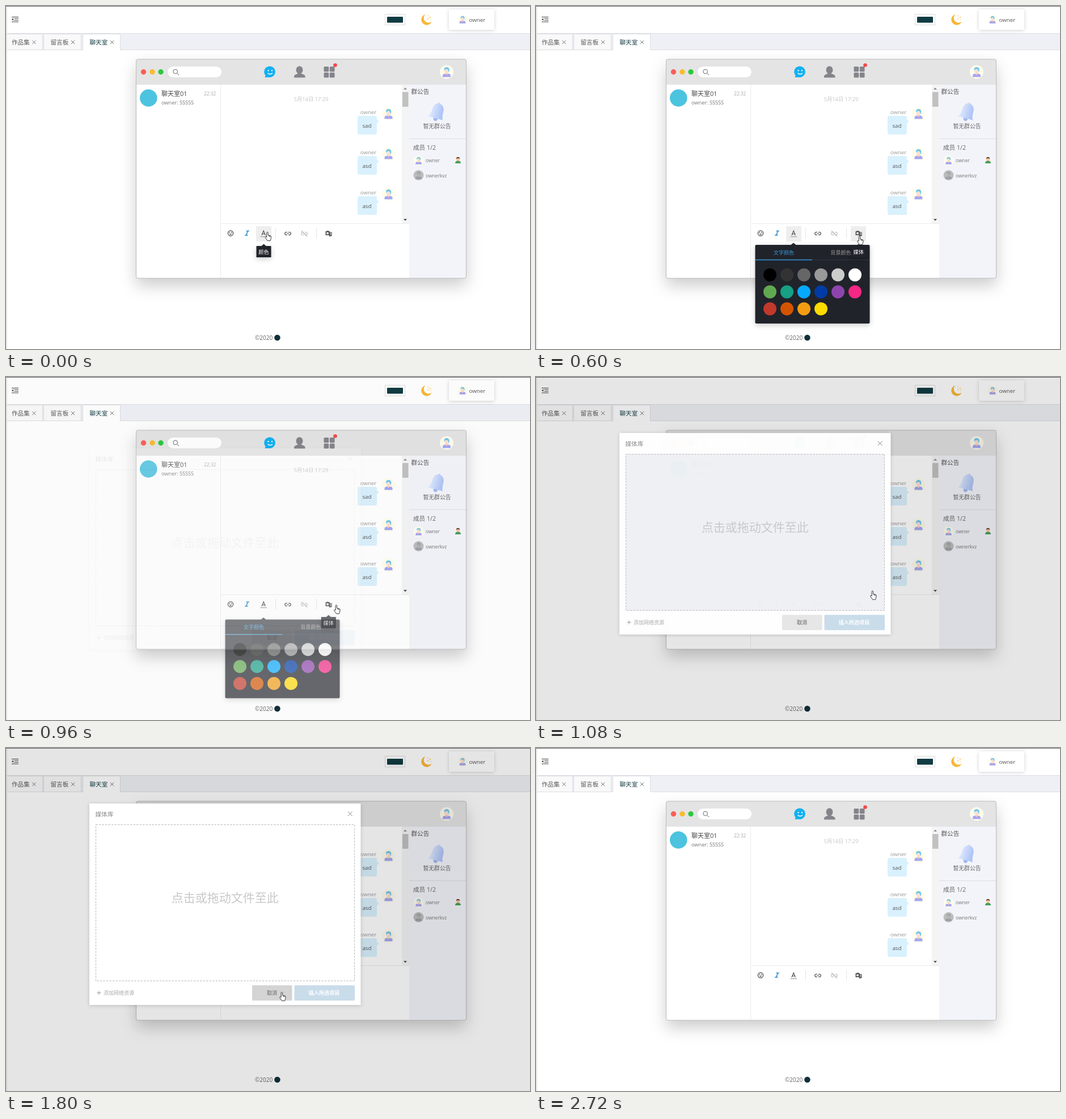
An HTML page for the animation above (2960 ms loop, 924 by 606 pixels).

```html
<!DOCTYPE html>
<html lang="zh-CN">
<head>
<meta charset="utf-8">
<title>聊天室</title>
<style>
html, body { margin: 0; height: 100%; overflow: hidden; background: #fff; }
svg { display: block; width: 100vw; height: 100vh; }
text { font-family: "Open Sans", "Noto Sans CJK SC", "Noto Sans CJK", sans-serif; white-space: pre; }
.mid { text-anchor: middle; }
.card { filter: drop-shadow(0 1px 3px rgba(0,0,0,.18)); }
.win { filter: drop-shadow(0 13px 14px rgba(0,0,0,.2)); }
.pop { filter: drop-shadow(0 3px 5px rgba(0,0,0,.2)); }
.line { fill: none; stroke: #444; stroke-width: 1.2; }
</style>
</head>
<body>
<svg viewBox="0 0 924 606">
  <defs>
    <linearGradient id="edge"><stop stop-color="#d8d8d8"/><stop offset="1" stop-color="#fff" stop-opacity="0"/></linearGradient>
    <linearGradient id="bell"><stop stop-color="#e3edfd"/><stop offset="1" stop-color="#a5bdf6"/></linearGradient>
    <g id="person">
      <path d="M-7 9V6.500Q-7 3.500-3 3H3Q7 3.500 7 6.500V9Z" fill="#a3a6f5"/>
      <path d="M-1.800 0H1.800V4L0 5.500-1.800 4Z" fill="#f7cdb8"/>
      <ellipse cy="-2.300" rx="3.700" ry="4.300" fill="#fde0d0"/>
      <path d="M-4.200-2.500Q-5.500-8.500 0-8.500 6-8.500 4.500-1L3.500 1Q3.500-4 .5-5.200-2.500-5.500-4.200-2.500Z" fill="#6cc6f0"/>
    </g>
    <g id="face"><circle r="12" fill="#fffcec"/><use href="#person"/></g>
    <path id="x" d="M-3.200-3.200 3.200 3.200M3.200-3.200-3.200 3.200" fill="none"/>
  </defs>

  <!-- page header and tabs -->
  <rect y="48.500" width="924" height="29.500" fill="#eff0f5"/>
  <path d="M0 48.500H924M0 77.500H924" stroke="#dcdee4"/>
  <g stroke="#dcdde2">
    <path d="M-1 49.500H64.500V77.500H-1ZM66.500 49.500H132.500V77.500H66.500Z" fill="#f9f9fa"/>
    <path d="M135.500 78V49.500H201.500V78" fill="#fff"/>
  </g>
  <g font-size="10.6" fill="#595959">
    <text x="10" y="67.800">作品集</text><text x="78.500" y="67.800">留言板</text>
    <text x="147.500" y="67.800" fill="#123c42" font-weight="500">聊天室</text>
  </g>
  <g stroke="#777"><use href="#x" x="49.500" y="64"/><use href="#x" x="118" y="64"/><use href="#x" x="187" y="64"/></g>
  <path d="M10 19.500H22M14.500 22.300H22M14.500 25.200H22M10 28H22" stroke="#444" stroke-width="1.100"/>
  <path d="M13 21.500V26L10 23.800Z" fill="#444"/>
  <rect x="668.500" y="14.500" width="35" height="19" fill="#fff" stroke="#ddd"/>
  <rect x="672" y="19" width="28" height="10.500" rx="1" fill="#113b42"/>
  <path d="M739.500 15A9.400 9.400 0 1 0 750.500 27.500 8 8 0 0 1 739.500 15Z" fill="#f8b735"/>
  <g fill="#fad784"><circle cx="744" cy="17.500" r="1"/><circle cx="748" cy="20" r="1.300"/><circle cx="744" cy="22.500" r="1.200"/><circle cx="749" cy="24" r=".8"/></g>
  <rect class="card" x="781" y="6" width="80" height="36" rx="2" fill="#fff"/>
  <use href="#face" transform="translate(805 24) scale(.75)"/>
  <text x="816.500" y="28" font-size="9.800" fill="#555">owner</text>
  <rect width="4" height="606" fill="url(#edge)"/>
  <path d="M0 .5H924" stroke="#666"/>

  <!-- chat window -->
  <rect class="win" x="229.500" y="94" width="582" height="387" rx="3" fill="#fff"/>
  <path d="M229.500 139V97Q229.500 94 232.500 94H808.500Q811.500 94 811.500 97V139Z" fill="#e4e4e4"/>
  <path d="M711 139H811.500V481H711Z" fill="#f3f4f9"/>
  <path d="M711 234.500H811" stroke="#dcdee4"/>
  <path d="M378.500 139V481M379 384.500H711" stroke="#ebebeb"/>
  <rect x="229.500" y="94" width="582" height="387" rx="3" fill="none" stroke="#bcbcbc"/>
  <circle cx="242.500" cy="116.500" r="4.700" fill="#fb5e57"/>
  <circle cx="258" cy="116.500" r="4.700" fill="#f8bc2f"/>
  <circle cx="273" cy="116.500" r="4.700" fill="#2bc840"/>
  <rect x="285" y="107" width="95" height="19" rx="9.500" fill="#fff"/>
  <path d="M301.800 119 305 122M302.500 115.800A3.800 3.800 0 1 1 294.900 115.800 3.800 3.800 0 1 1 302.500 115.800" fill="none" stroke="#666"/>
  <path d="M456 125.500Q458 124.500 457.500 122.500A9.800 9.800 0 1 1 463 125.800Q459 126.500 456 125.500Z" fill="#12b1f2"/>
  <circle cx="462.500" cy="114" r="1.200" fill="#fff"/><circle cx="469" cy="114" r="1.200" fill="#fff"/>
  <path d="M461.500 118.500Q465.700 122.500 470 118.500" fill="none" stroke="#fff" stroke-width="1.300"/>
  <g fill="#84848b">
    <ellipse cx="517.500" cy="113" rx="6" ry="6.800"/>
    <path d="M508 126.500V124Q508 121.500 514.500 119.500V117H520.500V119.500Q527.500 121.500 527.500 124V126.500Z"/>
    <rect x="560.500" y="107" width="8.700" height="9" rx="1.500"/><rect x="570.800" y="107" width="8.700" height="9" rx="1.500"/>
    <rect x="560.500" y="117.500" width="8.700" height="9" rx="1.500"/><rect x="570.800" y="117.500" width="8.700" height="9" rx="1.500"/>
  </g>
  <circle cx="580.500" cy="104.500" r="3.300" fill="#f5484a"/>
  <use href="#face" x="777" y="116.500"/>

  <circle cx="251.300" cy="162.500" r="15.300" fill="#4cc3df"/>
  <text x="274" y="159" font-size="11" fill="#444">聊天室01</text>
  <text x="274" y="174" font-size="9.200" fill="#777">owner: SSSSS</text>
  <text x="349" y="158" font-size="8.400" fill="#aaa">22:32</text>
  <text class="mid" x="538" y="167.500" font-size="9.300" fill="#c4c4c4">5月14日 17:29</text>
  <g id="messages"></g>
  <path d="M698 139H711V384H698Z" fill="#f4f4f4"/>
  <path d="M699 152H709.500V178H699Z" fill="#c1c1c1"/>
  <path d="M701 147.500H707L704 144.300Z" fill="#888"/><path d="M701 376.300H707L704 379.500Z" fill="#444"/>

  <text x="714.500" y="154.800" font-size="10.600" fill="#555">群公告</text>
  <g transform="translate(760 186) rotate(15)">
    <circle cx="1" cy="13.500" r="3.800" fill="#9fb8f3"/>
    <path d="M-14 12.500Q-9 9-9-2-9-12-1-14.500 0-17.500 2-14.500 11-12 11-2 11 9 14 12.500Z" fill="url(#bell)"/>
  </g>
  <text class="mid" x="760" y="216" font-size="9.800" fill="#666">暂无群公告</text>
  <text x="718" y="254" font-size="10.600" fill="#666">成员 1/2</text>
  <use href="#face" transform="translate(727.500 273) scale(.75)"/>
  <text x="740" y="276.300" font-size="8.500" fill="#777">owner</text>
  <circle cx="727.500" cy="299" r="9" fill="#bcbcbc"/>
  <g opacity=".5" style="filter:grayscale(.6) brightness(.75)"><use href="#person" transform="translate(727.500 299) scale(.75)"/></g>
  <text x="740" y="302.500" font-size="8.400" fill="#777">ownerkvz</text>
  <path d="M792 278Q792 274 795.500 273.500H798.500Q802 274 802 278Z" fill="#3fa65a"/>
  <circle cx="797" cy="270.500" r="3.100" fill="#f6c69b"/><path d="M793.700 270Q794 266.800 797 266.800T800.300 270Q797 268 793.700 270Z" fill="#6b4030"/>
  <path d="M796.200 273.500H797.800L797 277Z" fill="#e44"/>

  <!-- editor toolbar -->
  <rect id="hoverA" x="441" y="389" width="27" height="27" fill="#eee"/>
  <rect id="hoverMedia" x="555" y="389" width="27" height="27" fill="#eee"/>
  <path d="M475.500 392V411M547.500 392V411" stroke="#e4e4e4"/>
  <circle class="line" cx="396" cy="401.500" r="4.600"/>
  <path d="M393.600 402.500Q396 406 398.400 402.500Z" fill="#444"/><circle cx="394.200" cy="400" r=".8"/><circle cx="397.800" cy="400" r=".8"/>
  <path d="M423.500 397.500H429M421 405H426.500M426.300 397.500 423.700 405" stroke="#2f8fd0" stroke-width="1.600"/>
  <path class="line" d="M451 405 454.200 397.200 457.400 405M452.200 402.600H456.200" style="stroke:#555"/>
  <path d="M448.500 407.500H460" stroke="#aaa" stroke-width="1.500"/>
  <g id="link"><path class="line" d="M496 399.500H494.300A2.400 2.400 0 0 0 494.300 404.500H496M498 399.500H499.700A2.400 2.400 0 0 1 499.700 404.500H498M494.700 402H499.300"/></g>
  <g opacity=".35"><use href="#link" x="29"/><path class="line" d="M521 397 531 407"/></g>
  <path d="M563.500 398H565L566 397H568.500L569.500 398H571V405H563.500Z" fill="#555"/><circle cx="567" cy="401.500" r="1.900" fill="#fff"/>
  <path class="line" d="M571.800 406V400H574V405.500" style="stroke:#555"/><circle cx="571" cy="406" r="1.300" fill="#555"/><circle cx="573.300" cy="405.500" r="1.200" fill="#555"/>

  <text x="439" y="590" font-size="10" fill="#666">©2020</text>
  <circle cx="478.400" cy="586" r="5.300" fill="#12303a"/>

  <!-- colour picker -->
  <g id="picker">
    <path class="pop" d="M388.500 422H449.500L454 418.500 458.500 422H586.500Q588.500 422 588.500 424V559Q588.500 561 586.500 561H388.500Q386.500 561 386.500 559V424Q386.500 422 388.500 422Z" fill="#20232a"/>
    <path d="M387 448.500H588" stroke="#343840"/><path d="M387 448.500H487" stroke="#3498db" stroke-width="1.300"/>
    <text class="mid" x="437" y="438.500" font-size="9.100" fill="#3498db">文字颜色</text>
    <text class="mid" x="537.500" y="438.500" font-size="9.100" fill="#999">背景颜色</text>
    <g id="swatches"></g>
  </g>
  <g id="tipColor"></g>
  <g id="tipMedia"></g>

  <!-- media dialog -->
  <rect id="mask" width="924" height="606"/>
  <g id="dialog">
    <rect class="card" x="147" y="98" width="478.500" height="356" fill="#fff"/>
    <text x="157.500" y="120.800" font-size="10.600" fill="#888">媒体库</text>
    <use href="#x" transform="translate(606.700 116.300) scale(1.200)" stroke="#aaa" stroke-width=".9"/>
    <rect id="drop" x="158.500" y="135.500" width="456" height="276" stroke="#b8b8b8" stroke-dasharray="3.500 2"/>
    <text class="mid" x="386.300" y="271.800" font-size="21" fill="#c8c8c8">点击或拖动文件至此</text>
    <path d="M160.500 432.500H167.500M164 429V436" stroke="#999"/>
    <text x="172" y="436.300" font-size="9" fill="#aaa">添加网络资源</text>
    <rect id="cancel" x="434" y="419.300" width="70.500" height="27" rx="1.500"/>
    <text class="mid" x="469" y="436.300" font-size="9.100" font-weight="700" fill="#888">取消</text>
    <rect x="508.500" y="419.300" width="106.500" height="27" rx="1.500" fill="#c9dcea"/>
    <text class="mid" x="561" y="436.300" font-size="9.100" font-weight="700" fill="#fff">插入所选项目</text>
  </g>

  <path id="hand" d="M3.200 9.500V1.600a1.200 1.200 0 0 1 2.400 0V6l4.200.9q1.400.4 1.300 1.800l-.6 4-1 3H4.600L1 10.600q-.9-1.200.1-1.800t2.100.7zM7.300 6.500V8.500M9 7V9" fill="#fff" stroke="#222" stroke-width=".9"/>
</svg>
<script>
const $ = id => document.getElementById(id);
const LOOP = 2960, STEP = 40;

$("messages").innerHTML = ["sad", "asd", "asd"].map((word, i) => `
  <g transform="translate(0 ${i * 71})">
    <text class="mid" x="639" y="190.500" font-size="9.700" fill="#999">owner</text>
    <rect x="620" y="194" width="34" height="33" rx="3" fill="#d9f1fd"/>
    <path d="M653 200 658 203.500 653 208Z" fill="#d9f1fd"/>
    <text class="mid" x="636.500" y="215" font-size="9.800" fill="#555">${word}</text>
    <use href="#face" x="674.500" y="190.500"/>
  </g>`).join("");

const colors = ("000 333 666 999 ccc fff 61a951 16a085 07a9fe 003ba5 8e44ad f32784 " +
  "c0392b d35400 f39c12 fdda00").split(" ");
$("swatches").innerHTML = colors.map((c, i) =>
  `<circle cx="${412.5 + i % 6 * 30}" cy="${475 + Math.floor(i / 6) * 30}" r="11.500" fill="#${c}"/>`).join("");

function tip(id, x, label) {
  $(id).innerHTML = `<path class="pop" d="M${x - 13} 424H${x - 4}L${x} 420.500 ${x + 4} 424H${x + 13}V444H${x - 13}Z" fill="#20232a"/>
    <text class="mid" x="${x}" y="437.500" font-size="9.200" fill="#fff">${label}</text>`;
}
tip("tipColor", 454.5, "颜色");
tip("tipMedia", 568.8, "媒体");

// time, x, y of the pointer
const path = [[0, 456.5, 399], [160, 487, 401], [580, 566, 406], [860, 566, 406], [960, 578, 402.5],
  [1080, 589, 377.5], [1140, 589, 377.5], [1720, 485, 429], [1800, 482, 431]];

const ramp = (t, a, b) => Math.min(1, Math.max(0, (t - a) / (b - a)));

function pointer(t) {
  const i = path.findIndex(k => k[0] > t);
  if (i < 0) return path[path.length - 1].slice(1);
  const [a, x, y] = path[i - 1], [b, u, v] = path[i], p = ramp(t, a, b);
  return [x + (u - x) * p, y + (v - y) * p];
}

function fade(id, opacity, shift = 0) {
  const el = $(id);
  el.style.display = opacity > 0 ? "" : "none";
  el.setAttribute("opacity", opacity);
  el.setAttribute("transform", `translate(0 ${shift * (1 - opacity)})`);
}

function draw(t) {
  const [x, y] = pointer(t);
  const picker = (1 - (1 - ramp(t, 20, 240)) ** 3) * (1 - ramp(t, 910, 1065));
  const dialog = ramp(t, 938, 1084) * (1 - ramp(t, 1900, 2160));
  fade("picker", picker, 20);
  fade("tipColor", 1 - ramp(t, 40, 175));
  fade("tipMedia", ramp(t, 500, 600) * (1 - ramp(t, 930, 1070)));
  fade("hoverA", t < 920 ? 1 : 0);
  fade("hoverMedia", t >= 600 && t < 940 ? 1 : 0);
  fade("mask", dialog * .1);
  $("mask").removeAttribute("transform");
  fade("dialog", dialog, 33);

  const over = ramp(t, 960, 1080) * (1 - ramp(t, 1540, 1700));
  $("drop").setAttribute("fill", `rgb(${255 - 16 * over},${255 - 14 * over},${255 - 10 * over})`);
  const gray = 230 - 18 * ramp(t, 1620, 1780);
  $("cancel").setAttribute("fill", `rgb(${gray},${gray},${gray})`);

  $("hand").style.display = t < 2200 ? "" : "none";
  $("hand").setAttribute("transform", `translate(${x} ${y})`);
}

const start = performance.now();
function tick() {
  const t = (performance.now() - start) % LOOP;
  draw(Math.floor(t / STEP) * STEP);
  requestAnimationFrame(tick);
}
tick();
</script>
</body>
</html>
```
